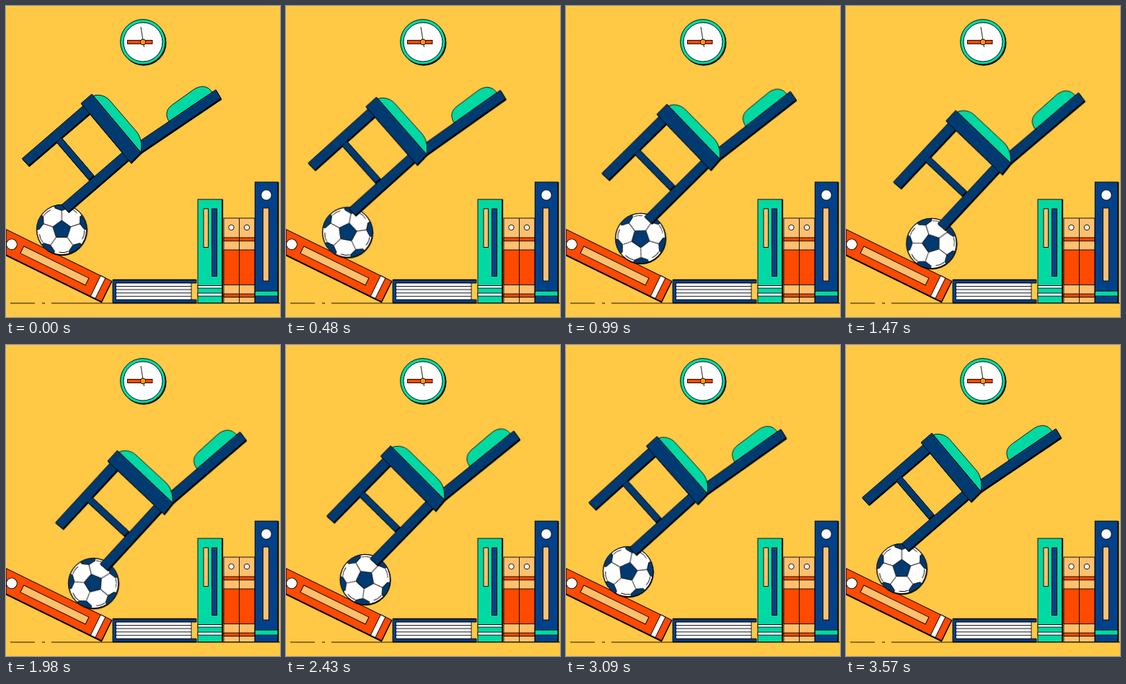
Animation, 380 px wide and 431 px high, one loop 3.6 s. Source, as an HTML page:

```html
<!DOCTYPE html>
<html lang="en">
<head>
<meta charset="utf-8">
<title>Balancing chair</title>
<style>
  html, body { margin: 0; width: 100%; height: 100%; overflow: hidden; background: #ffc845; }
  svg { display: block; width: 380px; height: 431px; }
  .ink { stroke: #000; stroke-width: .9; }
  .navy { fill: #003a70; }
  .blue { fill: #00418a; }
  .green { fill: #00d9a3; }
  .orange { fill: #ff4a00; }
  .tan { fill: #ffc06e; }
  .white { fill: #fff; }
  .line { fill: none; }
  .chair, .ball, .spin {
    animation: 1800ms cubic-bezier(.333, 0, .667, 1) infinite alternate;
  }
  .ball { animation-name: slide; }
  .spin { animation-name: spin; }
  .chair { animation-name: tilt; transform-origin: 78px 276px; }
  @keyframes slide {
    from { transform: translate(77.3px, 310px); }
    to { transform: translate(122.6px, 330.8px); }
  }
  @keyframes spin {
    from { transform: rotate(0deg); }
    to { transform: rotate(60deg); }
  }
  @keyframes tilt {
    from { transform: translate(0, 0) rotate(0deg); }
    to { transform: translate(54.8px, 28.7px) rotate(-6.8deg); }
  }
</style>
</head>
<body>
<svg viewBox="0 0 380 431">
  <defs>
    <g id="sector">
      <path class="navy" d="M0-26.500 9.500-30 11-36H-11L-9.500-30Z"/>
      <path class="line" d="M0-13V-26.500"/>
      <path class="line" d="M9.500-30Q15.500-29 20.500-23.800" transform="rotate(2)"/>
    </g>
    <path id="back" d="M291 116 298 128 187 203 180 191Z"/>
    <g id="legs">
      <path d="M69.600 188 76.600 182 122 235 115 241Z"/>
      <path d="M22.300 211.400 31.300 221.200 117.500 147.400 108.500 137Z"/>
      <path d="M77.300 275.400 86.200 285.200 172.500 210.700 163.500 201Z"/>
    </g>
    <path id="seat" d="M119 122 187 203 173 217 104 135Z"/>
    <clipPath id="rim"><circle r="34.7"/></clipPath>
  </defs>

  <rect width="380" height="431" fill="#ffc845"/>
  <path class="ink line" d="M6 411.900H40M50 411.900H54M63 411.900H380"/>

  <!-- clock -->
  <g class="ink">
    <circle cx="191" cy="51.2" r="31"/>
    <circle class="green" cx="189.8" cy="49.8" r="31.2"/>
    <circle class="white" cx="190" cy="50" r="27"/>
    <rect class="orange" x="168.5" y="47.5" width="34.5" height="5"/>
    <path d="M187 29 191.5 57"/>
    <circle cx="190" cy="50" r="3.9" fill="#ff9800"/>
  </g>

  <!-- leaning book -->
  <g class="ink" transform="translate(0 309.4) rotate(26.1)">
    <rect x="-20" y="1.2" width="183.700" height="31.700"/>
    <rect class="orange" x="-20" width="183.2" height="31.700"/>
    <rect class="white" x="146.2" width="7.3" height="31.700"/>
    <rect class="tan" x="32.500" y="10.300" width="100.5" height="10.8"/>
    <circle class="white" cx="16.3" cy="15.3" r="7.4"/>
  </g>
  <path class="ink" d="M.2 310V346"/>

  <!-- flat book -->
  <g class="ink">
    <path class="blue" d="M148 379.5H264V384H153V407H264V411.5H148Z"/>
    <rect class="white" x="152.5" y="384" width="104.5" height="23"/>
    <path class="line" d="M152.5 388.5H257M152.5 393H257M152.5 397.7H257M152.5 402.3H257"/>
    <path d="M148 379.5H264M148 411.5H264" stroke-width="1.4"/>
  </g>

  <!-- standing books -->
  <g class="ink">
    <rect x="267" y="268.5" width="33.700" height="143"/>
    <rect class="green" x="266" y="268" width="33.7" height="143.5"/>
    <rect class="tan" x="274" y="281" width="6.5" height="53.5"/>
    <rect class="blue" x="285.5" y="281" width="7" height="93.5"/>
    <rect class="white" x="266" y="387.5" width="33.7" height="3.5"/>
    <rect class="white" x="266" y="398" width="33.7" height="4"/>

    <rect class="tan" x="302" y="294" width="43" height="117.5"/>
    <rect class="orange" x="302" y="321" width="43" height="4.7"/>
    <rect class="orange" x="302" y="338" width="43" height="48.5"/>
    <rect class="orange" x="302" y="399" width="43" height="4.5"/>
    <path d="M323.5 294V411.5"/>
    <circle class="white" cx="312.5" cy="307" r="3.7"/>
    <circle class="white" cx="334" cy="307" r="3.7"/>

    <rect x="346" y="244.5" width="32" height="167"/>
    <rect class="blue" x="345.3" y="244" width="31.7" height="167.5"/>
    <circle class="white" cx="361" cy="262" r="7.2"/>
    <rect class="tan" x="356.500" y="280" width="8" height="101"/>
    <rect class="green" x="345.3" y="395" width="31.7" height="7"/>
  </g>

  <g class="ball ink">
    <circle cx=".6" cy="1" r="34.7"/>
    <circle class="white" r="34.7"/>
    <g class="spin">
      <g clip-path="url(#rim)">
        <path class="navy" d="M0-13 12.400-4 7.700 10.500-7.700 10.500-12.400-4Z"/>
        <use href="#sector"/>
        <use href="#sector" transform="rotate(72)"/>
        <use href="#sector" transform="rotate(144)"/>
        <use href="#sector" transform="rotate(216)"/>
        <use href="#sector" transform="rotate(288)"/>
      </g>
    </g>
    <circle class="line" r="34.7"/>
  </g>

  <g class="chair ink">
    <g transform="translate(1 1.5)">
      <use href="#back"/><use href="#legs"/><use href="#seat"/>
    </g>
    <path class="green" d="M226 160C221.500 152 221 144 230.500 137L258.500 117C268 110 279 109 286 119.500Z"/>
    <use class="navy" href="#back"/>
    <path class="green" d="M121 124.500C128 122 137.500 124 143.500 130.500L181 174C187 181.500 189 191 187 203Z"/>
    <use class="navy" href="#legs"/>
    <use class="navy" href="#seat"/>
  </g>
</svg>
</body>
</html>
```
